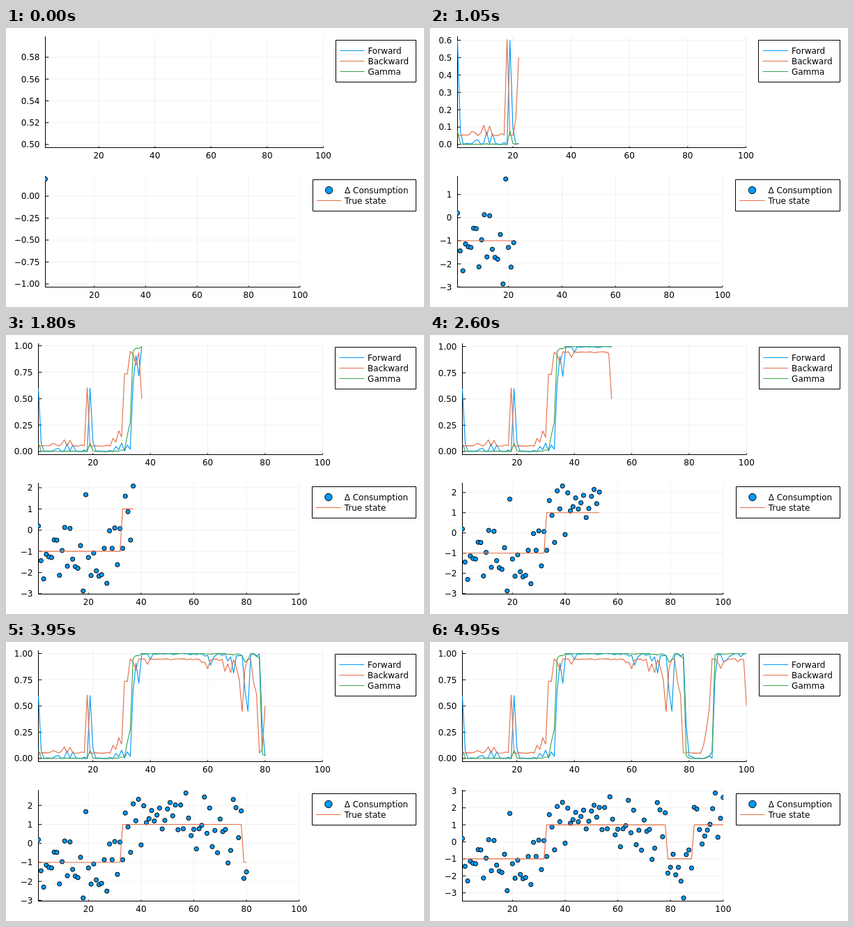
Write an HTML page with a canvas that moves like this. It is 600x400 px and loops after 5000 ms.

```html
<!DOCTYPE html>
<html lang="en">
<head>
<meta charset="utf-8">
<title>Forward–backward smoothing</title>
<style>
html, body { margin: 0; width: 100%; height: 100%; overflow: hidden; background: #fff; }
canvas { display: block; width: 600px; height: 400px; }
</style>
</head>
<body>
<canvas id="stage" width="600" height="400"></canvas>
<script>
const ctx = document.getElementById('stage').getContext('2d');
const BLUE = '#009afa', ORANGE = '#e36f47', GREEN = '#3ea44e';
const STEP_MS = 50, COUNT = 100, STAY = 0.95;

const observed = [
  0.195, -1.44, -2.3, -1.14, -1.26, -1.29, -0.46, -0.475, -2.13, -0.96,
  0.125, -1.7, 0.08, -1.37, -1.72, -1.8, -0.73, -2.87, 1.67, -1.29,
  -2.14, -1.08, -1.92, -2.17, -2.1, -0.86, -2.51, -0.03, -0.86, 0.1,
  -1.63, 0.07, -0.86, 1.6, 0.87, -0.47, 2.08, 1.19, 2.32, -0.08,
  1.98, 1.09, 1.3, 1.73, 1.18, 1.49, 1.86, 0.76, 1.21, 1.81,
  2.15, 1.45, 2.02, 0.72, 2.02, 0.77, 2.65, 1.33, 0.41, 0.74,
  -0.29, 0.77, 0.95, 2.44, 0.53, 1.86, -0.17, 0.68, -0.49, 1.28,
  0.62, 0.73, -1.03, -0.37, 2.31, 1.88, 0.3, 1.71, -1.84, -1.5,
  -0.73, -1.94, -1.5, -2.31, -3.3, -0.75, -0.48, -1.54, 2.03, 1.93,
  0.72, -0.13, 0.34, 0.69, 1.03, 1.95, 2.87, 0.27, 1.38, 2.61
];
const trueState = observed.map((_, i) => (i < 32 || (i >= 78 && i < 88) ? -1 : 1));

// Two-state model: means of ±1, unit variance.
const combine = (p, q) => p * q / (p * q + (1 - p) * (1 - q));
const transit = p => STAY * p + (1 - STAY) * (1 - p);
const evidence = observed.map(y => 1 / (1 + Math.exp(-2 * y)));

function smooth(n) {
  const forward = [evidence[0]], backward = [];
  for (let i = 1; i < n; i++) forward[i] = combine(transit(forward[i - 1]), evidence[i]);
  backward[n - 1] = 0.5;
  for (let i = n - 2; i >= 0; i--) backward[i] = transit(combine(backward[i + 1], evidence[i + 1]));
  return { forward, backward, gamma: forward.map((p, i) => combine(p, backward[i])) };
}

function limits(...series) {
  const all = series.flat(), lo = Math.min(...all), hi = Math.max(...all);
  const pad = (hi - lo) * 0.03;
  return [lo - pad, hi + pad];
}

// Scores candidate steps by tick count, zero, coverage and niceness.
function chooseTicks([lo, hi]) {
  const nice = [[1, 1], [5, 0.9], [2.5, 0.5], [2, 0.7], [3, 0.2]];
  let best = { score: -1 };
  for (let z = -3; z <= 1; z++) for (const [q, niceness] of nice) {
    const step = q * 10 ** z;
    const first = Math.ceil(lo / step), last = Math.floor(hi / step), n = last - first + 1;
    if (n < 4 || n > 8) continue;
    const score = (1 - Math.abs(n - 5) / 5) / 4 + (first <= 0 && last >= 0 ? 1 / 6 : 0)
      + 0.5 * (hi - lo) / ((n - 1) * step) + niceness / 4;
    if (score > best.score + 1e-9) {
      const decimals = Math.max(0, -z + (q === 2.5 ? 1 : 0));
      const values = Array.from({ length: n }, (_, i) => (first + i) * step);
      const labels = values.map(v => (v < -1e-9 ? '−' : '') + Math.abs(v).toFixed(decimals));
      best = { score, values, labels };
    }
  }
  return best;
}

function line(x1, y1, x2, y2, color = '#000', width = 1) {
  ctx.strokeStyle = color;
  ctx.lineWidth = width;
  ctx.beginPath();
  ctx.moveTo(x1, y1);
  ctx.lineTo(x2, y2);
  ctx.stroke();
}

function label(text, x, y, align) {
  ctx.fillStyle = '#000';
  ctx.textAlign = align;
  ctx.fillText(text, x, y + 4.4);
}

function dot(x, y, r) {
  ctx.beginPath();
  ctx.arc(x, y, r, 0, 2 * Math.PI);
  ctx.fillStyle = BLUE;
  ctx.fill();
  ctx.strokeStyle = '#000';
  ctx.lineWidth = 1;
  ctx.stroke();
}

function drawPanel({ left, right, top, range, ticks, curves, dots }) {
  const height = 159.5, bottom = top + height;
  const px = v => left + (v - 1) / 99 * (right - left);
  const py = v => bottom - (v - range[0]) / (range[1] - range[0]) * height;
  const xTicks = [20, 40, 60, 80, 100];

  xTicks.forEach(v => line(px(v), top, px(v), bottom, 'rgba(0,0,0,0.1)', 0.6));
  ticks.values.forEach(v => line(left, py(v), right, py(v), 'rgba(0,0,0,0.1)', 0.6));
  line(left, top, left, bottom + 0.5);
  line(left, bottom, right, bottom);
  xTicks.forEach(v => {
    line(px(v), bottom, px(v), bottom - 2);
    label(v, px(v), bottom + 11.4, 'center');
  });
  ticks.values.forEach((v, i) => {
    line(left, py(v), left + 4.8, py(v));
    label(ticks.labels[i], left - 8, py(v), 'right');
  });

  ctx.save();
  ctx.beginPath();
  ctx.rect(left - 0.5, top - 0.5, right - left + 1, height + 1);
  ctx.clip();
  if (dots) dots.forEach((v, i) => dot(px(i + 1), py(v), 3.1));
  for (const [color, data] of curves) {
    ctx.strokeStyle = color;
    ctx.lineWidth = 1.15;
    ctx.beginPath();
    data.forEach((v, i) => ctx.lineTo(px(i + 1), py(v)));
    ctx.stroke();
  }
  ctx.restore();
}

function drawLegend(x, y, shift, entries) {
  const boxLeft = Math.round(x - 2 * shift) + 0.5;
  const from = x + 6 - 1.7 * shift, to = x + 41.2 - 0.6 * shift;
  ctx.strokeStyle = '#000';
  ctx.lineWidth = 1;
  ctx.strokeRect(boxLeft, y, 588.5 - boxLeft, 15 * (entries.length + 1));
  entries.forEach(([text, color], i) => {
    const row = y + 15 * (i + 1);
    if (color) line(from, row, to, row, color, 1.15);
    else dot((from + to) / 2, row, 5.2);
    label(text, x + 46 - 0.5 * shift, row, 'left');
  });
}

function draw(n) {
  ctx.fillStyle = '#fff';
  ctx.fillRect(0, 0, 600, 400);
  ctx.font = '12px "DejaVu Sans", sans-serif';
  ctx.lineJoin = 'round';

  const { forward, backward, gamma } = smooth(n);
  const dots = observed.slice(0, n), state = trueState.slice(0, n);
  const upper = limits(forward, backward, gamma), lower = limits(dots, state);
  const upperTicks = chooseTicks(upper), lowerTicks = chooseTicks(lower);

  // The widest tick label sets the shared left margin.
  const widest = Math.max(...[...upperTicks.labels, ...lowerTicks.labels].map(t => ctx.measureText(t).width));
  const left = Math.round(widest + 19.5) + 0.5;
  const shift = (56.5 - left) / 17;

  drawPanel({
    left, right: 455.5 - 2 * shift, top: 12, range: upper, ticks: upperTicks,
    curves: [[BLUE, forward], [ORANGE, backward], [GREEN, gamma]]
  });
  drawPanel({
    left, right: 422 - 2 * shift, top: 212, range: lower, ticks: lowerTicks,
    curves: [[ORANGE, state]], dots
  });
  drawLegend(473.4, 17.5, shift, [['Forward', BLUE], ['Backward', ORANGE], ['Gamma', GREEN]]);
  drawLegend(440, 217.5, shift, [['Δ Consumption', null], ['True state', ORANGE]]);
}

let shown = 0;
function tick() {
  const n = Math.floor(performance.now() / STEP_MS) % COUNT + 1;
  if (n !== shown) draw(shown = n);
  requestAnimationFrame(tick);
}
tick();
</script>
</body>
</html>
```
